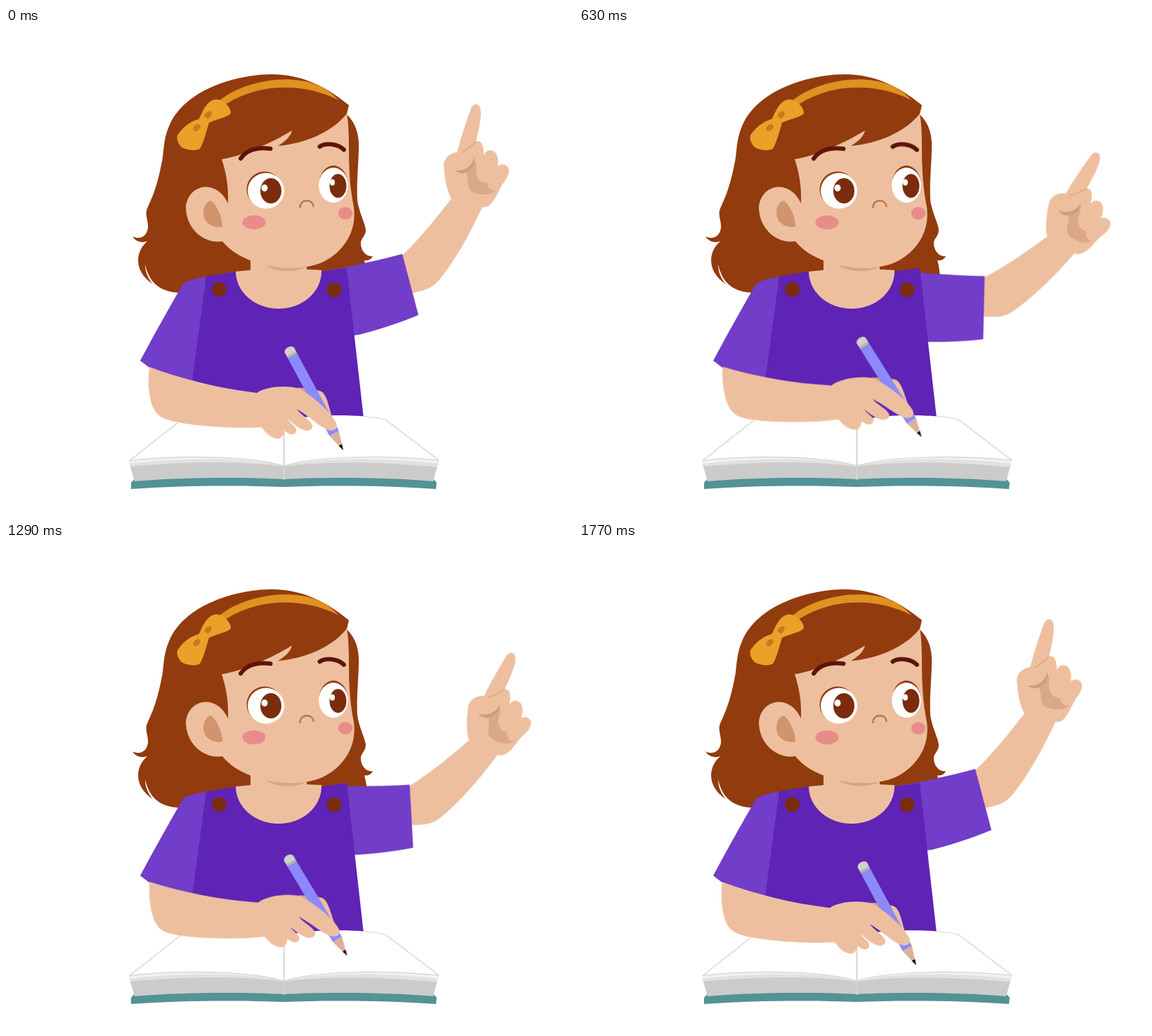
These frames come from a looping animation (807x694 px, 1.8 s). An HTML page without scripts:

```html
<!DOCTYPE html>
<html lang="en">
<head>
<meta charset="utf-8">
<title>Girl raising her hand</title>
<style>
  html, body { margin: 0; width: 100%; height: 100%; overflow: hidden; background: #fff; }
  svg { display: block; width: 807px; height: 694px; }

  .skin { fill: #eebf9f; }
  .shade { fill: #daa887; }
  .hair { fill: #923b0e; }
  .iris { fill: #7b2c0c; }
  .shirt { fill: #5f23b5; }
  .sleeve { fill: #723dc8; }
  .white { fill: #fff; }
  .line { fill: none; stroke-linecap: round; stroke-linejoin: round; }
  .brow { stroke: #5e140a; stroke-width: 6; }
  .edge { stroke: #d2d2d2; stroke-width: 1.2; }

  .raised, .writing { animation: 1.8s cubic-bezier(.333, 0, .667, 1) infinite; }
  .raised { transform-origin: 459px 385px; animation-name: wave; }
  .writing { transform-origin: 200px 478px; animation-name: write; }
  .lid, .brows { animation: 1.8s ease-in-out infinite; }
  .lid { animation-name: blink; }
  .brows { animation-name: frown; }

  @keyframes wave {
    0%, 98.9%, 100% { transform: rotate(0deg); }
    49.44% { transform: rotate(20.25deg); }
  }
  @keyframes write {
    0%, 98.9%, 100% { transform: rotate(0deg); }
    49.44% { transform: rotate(-4.8deg); }
  }
  @keyframes blink {
    0%, 34.4%, 62.8%, 100% { transform: translateY(-48px); }
    43.3%, 53.9% { transform: translateY(0); }
  }
  @keyframes frown {
    0%, 34.4%, 62.8%, 100% { transform: translateY(0); }
    43.3%, 53.9% { transform: translateY(14.5px); }
  }
</style>
</head>
<body>
<svg viewBox="0 0 807 694">
  <defs>
    <clipPath id="eyes">
      <ellipse cx="369.5" cy="231" rx="29" ry="28"/>
      <ellipse cx="466" cy="222.5" rx="23" ry="28"/>
    </clipPath>
  </defs>

  <!-- hair -->
  <path class="hair" d="M488 110C460 87 425 66 378 66C328 66 253 88 232 140C223 160 225 180 221 195
    C215 225 209 240 201 257C197 266 203 276 202 285C200 298 190 302 180 297C184 304 193 307 201 304
    C184 318 181 347 209 365C202 357 198 347 198 337C202 356 212 369 228 374Q240 378 256 377L300 390H514
    C515 360 514 345 510 331C515 332 520 330 522 325C513 327 504 317 505 305C506 299 512 296 512 288
    C511 277 503 265 500 245C499 220 501 205 502 175C503 155 500 138 485 123Z"/>

  <!-- raised arm -->
  <g class="raised">
    <path class="skin" d="M555 332L566 322C592 297 615 267 634 243C627 232 624 212 623 195
      C624 184 633 178 642 177C648 155 655 133 661 117C664 108 670 106 674 112C678 120 675 136 669 162
      C677 158 680 169 680 181C684 173 690 173 695 176C701 182 701 190 700 197C705 193 712 194 715 199
      C718 207 712 216 707 222C702 230 700 237 696 243C690 253 684 256 678 255C661 292 638 333 619 356
      C608 370 600 374 570 379Z"/>
    <path class="shade" d="M655 206C659 217 655 227 663 233C674 239 690 239 697 232
      C690 232 685 228 685 220C674 222 668 212 669 200C670 190 666 182 661 178C668 190 665 200 655 206Z"/>
    <path class="skin" d="M636 185C645 175 660 174 665 181C668 191 658 202 645 203Z"/>
    <path d="M639 203C652 205 663 197 666 186C668 196 659 207 649 207C645 207 641 205 639 203Z" fill="#cf9b79"/>
    <path class="line" d="M649 177C655 176 662 167 669 162" stroke="#daa887" stroke-width="1.6"/>
    <path class="sleeve" d="M450 347L488 340C515 334 540 328.5 564 322L587 409C555 422 530 430 503 437L470 441Z"/>
  </g>

  <!-- body -->
  <path class="sleeve" d="M285 354Q267 357 253 363C234 395 211 437 191 474L204 484L225 510L275 515Z"/>
  <path class="shirt" d="M285 354L327 347H449L485 342L509 556H300L262 525Z"/>
  <path class="skin" d="M348 320H428V344L449 345V347A61 53 0 0 1 327 347L348 345Z"/>
  <g class="iris">
    <circle cx="303.5" cy="372.5" r="10.5"/>
    <circle cx="467" cy="373" r="10.5"/>
  </g>

  <!-- head -->
  <path d="M368 337C382 349 414 349 428 340Z" fill="#d9a583"/>
  <path class="skin" d="M307 187C335 183 378 164 407 146C405 155 397 162 387 168C425 165 465 148 485 122
    C487 132 488 150 488 170C488 205 490 230 495 255C500 290 480 320 450 334C425 345 385 345 350 332
    C330 325 316 314 308 304C280 308 256 285 256 255C259 222 300 214 316 250C317 225 313 205 307 187Z"/>
  <path d="M291 246C300 251 308 270 308 283C295 286 281 278 281 264C281 254 285 248 291 246Z" fill="#d2936f"/>
  <g fill="#e88c8b">
    <ellipse cx="353" cy="277" rx="16.5" ry="10"/>
    <ellipse cx="483" cy="264" rx="10.2" ry="9"/>
  </g>
  <path class="line" d="M418.5 256C418 243 437 243 437.5 254" stroke="#b9774f" stroke-width="2.3"/>

  <!-- eyes -->
  <g class="hair">
    <ellipse cx="368" cy="230" rx="25.5" ry="25.5"/>
    <ellipse cx="466" cy="221" rx="20" ry="25"/>
  </g>
  <g class="white">
    <ellipse cx="370" cy="232" rx="26" ry="25.5"/>
    <ellipse cx="466" cy="224" rx="20.8" ry="25"/>
  </g>
  <g class="iris">
    <ellipse cx="377" cy="232" rx="15" ry="18"/>
    <ellipse cx="472.5" cy="225" rx="12" ry="17"/>
  </g>
  <g class="white">
    <ellipse cx="368" cy="228" rx="4.5" ry="5"/>
    <ellipse cx="464.5" cy="220" rx="3.5" ry="4.5"/>
  </g>
  <g clip-path="url(#eyes)">
    <path class="skin lid" d="M338 130H402V235.5L338 241ZM440 130H491V227.5L440 232Z"/>
  </g>
  <g class="line brow brows">
    <path d="M334 186C342 174 358 169 376.5 172"/>
    <path d="M446.5 169C455 163 472 165 481 173.5"/>
  </g>

  <!-- hairband and bow -->
  <path d="M302 105C338 72 435 55 473 103C430 80 365 76 314 108Z" fill="#e0911f"/>
  <path d="M276 127C283 110 291 100 302 102C312 104 319 113 320 120C321 126 301 129 289 135
    C285 148 281 164 276 172C270 176 255 174 249 169C244 163 241 155 246 150C254 139 265 132 274 130Z" fill="#eca028"/>
  <g fill="#c9781c">
    <ellipse cx="287.5" cy="124" rx="6.5" ry="4" transform="rotate(-48 287.5 124)"/>
    <ellipse cx="271.5" cy="142" rx="6" ry="4" transform="rotate(-42 271.5 142)"/>
  </g>
  <ellipse cx="280.5" cy="132" rx="6.5" ry="5" fill="#eca028" transform="rotate(-40 280.5 132)"/>

  <!-- book -->
  <path d="M178 648L184 641H607L613 648L612 657C540 651.5 450 651.5 395 654C340 651.5 250 651.5 178 657Z" fill="#529396"/>
  <path d="M176 622L183 646C250 640 340 640 395 643C450 640 540 640 608 646L614 624L560 608H230Z" fill="#cbcbcb"/>
  <path d="M175 618L177 625C250 618 340 617 395 625C450 617 540 618 614 626L616 616L560 600H230Z" fill="#e1e1e1"/>
  <path d="M175 617L176 621C250 612 345 612 395 624C445 612 540 612 615 621L616 616L560 600H230Z" fill="#f1f1f1"/>
  <path class="white" d="M176 616.5L250 558C300 550 365 548 395 562C415 553 450 552 475 552
    C500 552 522 554 540 558L616 616C540 608 440 610 395 624C350 610 250 608 176 616.5Z"/>
  <path class="line edge" d="M250 558L176 616.5C250 608 350 610 395 624C440 610 540 608 616 616L540 558C528 555 518 554 509 553.5"/>
  <path class="line" d="M395.5 566V643" stroke="#d4d4d4" stroke-width="2"/>

  <!-- writing arm -->
  <g class="writing">
    <path d="M413 513C424 512 446 515 451 520C457 530 460 541 464 554L452 560Z" fill="#d9a07e"/>
    <path class="skin" d="M444 517C454 516 458 531 463 553L456 552Z"/>
    <g transform="translate(401 454.5) rotate(61.8)">
      <path d="M12-7.500H5C-1-6-1 6 5 7.500H12Z" fill="#d0d0cd"/>
      <path d="M11-7.500H15V7.500H11Z" fill="#b3b6ae"/>
      <path d="M15-7.500H140V7.500H15Z" fill="#8c8afb"/>
      <path d="M140-7.500L167 0L140 7.500Z" fill="#dcb199"/>
      <path d="M158.500-2.700L167 0L158.500 2.700Z" fill="#15130f"/>
    </g>
    <path class="skin" d="M204 483C250 500 300 513 357 520C368 511 400 508 418 514C436 525 462 546 470 563
      C473 571 467 575 459 573C444 567 431 553 414 543C419 551 432 557 436 566
      C437 573 430 576 421 572C413 568 407 562 401 557C405 564 412 567 413 572
      C414 579 407 581 401 577L396 574C395 582 391 586 385 585C375 583 369 576 364 569
      C320 572 252 566 230 558C214 554 207 542 204 520C202 506 203 493 204 483Z"/>
  </g>
</svg>
</body>
</html>
```
